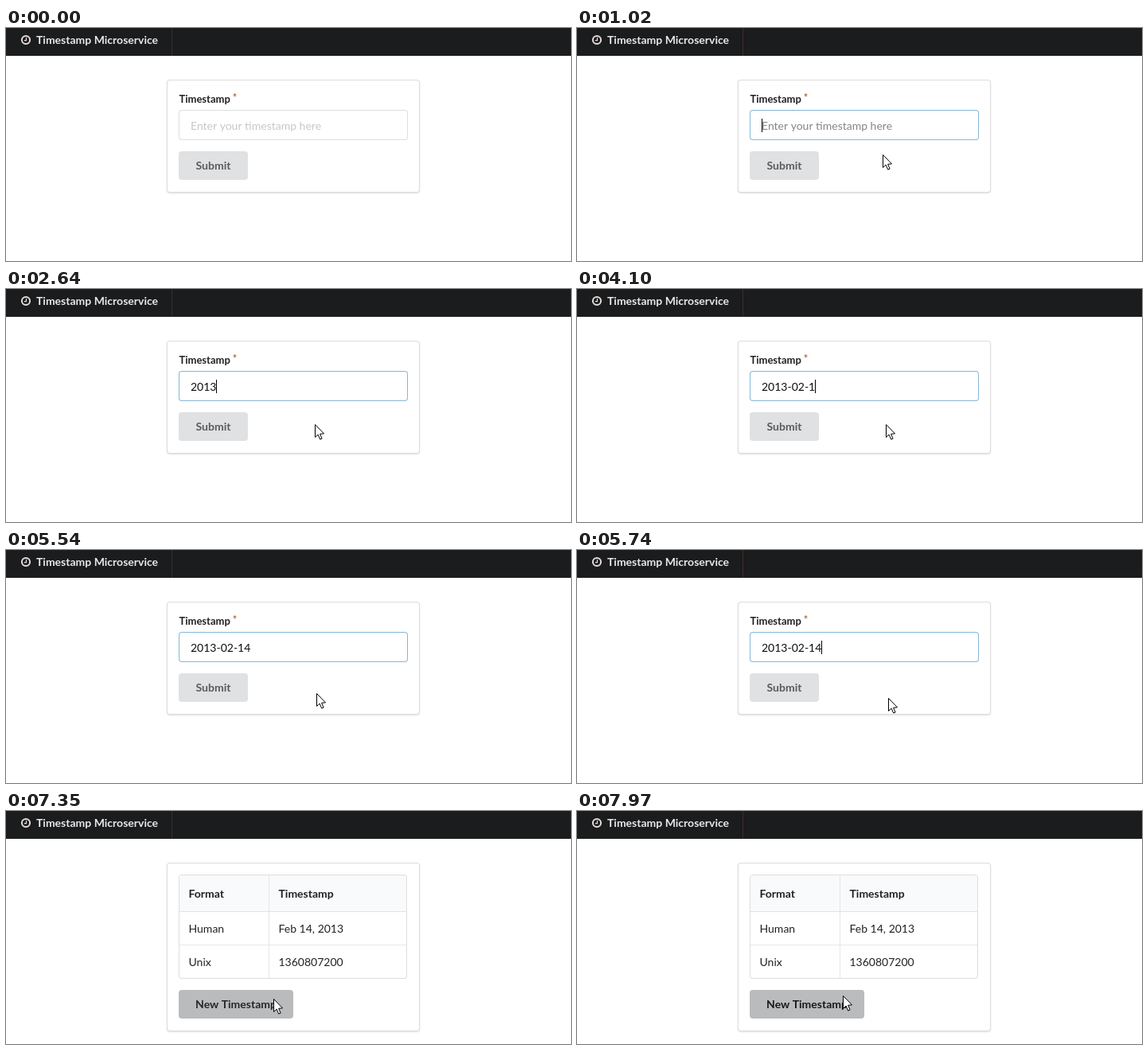
Animation, 710 px wide and 293 px high, one loop 8 s. Source, as an HTML page with a canvas:

```html
<!DOCTYPE html>
<html lang="en">
<head>
<meta charset="utf-8">
<title>Timestamp form</title>
<style>
  html, body { margin: 0; width: 100%; height: 100%; overflow: hidden; background: #fff; }
  canvas { display: block; }
</style>
</head>
<body>
<canvas id="stage" width="710" height="293"></canvas>
<script>
const ctx = document.getElementById('stage').getContext('2d');
const LOOP = 8000;
const RESULT_AT = 5940;
const BORDER = '#dededf';
const INK = 'rgba(0,0,0,.87)';
const SOFT = 'rgba(0,0,0,.6)';
const DATES = ['2016-05-22', '20 Jan 2015', '2011-05-22', '2012-03-15', '2015 02 03', '2015 Jan 02'];

// Each track holds [start time, ...values], kept until the next entry.
const pointer = [
  [0], [200, 495, 274], [400, 430, 190], [600, 376, 116, 'text'],
  [1020, 384, 159], [1220, 387, 166], [1420, 388, 170],
  [5340, 389, 175], [5540, 390, 180], [5740, 391, 186], [5940, 393, 194],
  [6140, 396, 202], [6550, 424, 215], [6750, 440, 226], [6990, 400, 232],
  [7150, 354, 235], [7350, 336, 236], [7770, 335, 234], [7970, 334, 232]
];
const typed = [
  [0, ''], [2040, '2'], [2240, '20'], [2440, '201'], [2640, '2013'], [2860, '2013-'],
  [3460, '2013-0'], [3680, '2013-02'], [3880, '2013-02-'], [4080, '2013-02-1'], [4300, '2013-02-14']
];
const caret = [
  [0, false], [1020, true], [1420, false], [2040, true], [3060, false], [3260, true],
  [4720, false], [5120, true], [5540, false], [5740, true]
];
const resetButton = [
  [0, '#e0e1e2', SOFT], [7150, '#cacbcd', 'rgba(0,0,0,.75)'],
  [7350, '#babbbc', 'rgba(0,0,0,.8)'], [7770, '#babbbc', 'rgba(0,0,0,.87)']
];

function at(track, t) {
  let found = track[0];
  for (const key of track) if (key[0] <= t) found = key;
  return found.slice(1);
}

const lato = (size, weight = 400) => `${weight} ${size}px Lato, sans-serif`;

function text(str, x, y, font, color, align = 'left') {
  ctx.font = font;
  ctx.fillStyle = color;
  ctx.textAlign = align;
  ctx.fillText(str, x, y);
}

function rect(x, y, w, h, color) {
  ctx.fillStyle = color;
  ctx.fillRect(x, y, w, h);
}

function fillRound(x, y, w, h, color, radius = 4) {
  ctx.beginPath();
  ctx.roundRect(x, y, w, h, radius);
  ctx.fillStyle = color;
  ctx.fill();
}

function box(x, y, w, h, border, fill = '#fff') {
  fillRound(x, y, w, h, border);
  fillRound(x + 1, y + 1, w - 2, h - 2, fill, 3);
}

function drawNav() {
  rect(0, 0, 710, 35, '#1b1c1d');
  rect(208, 0, 1, 35, '#3b2d2f');
  ctx.strokeStyle = '#e4dcda';
  ctx.lineWidth = 2;
  ctx.beginPath();
  ctx.arc(25, 15, 5.1, 0, Math.PI * 2);
  ctx.stroke();
  ctx.lineWidth = 1.2;
  ctx.beginPath();
  ctx.moveTo(25.5, 12);
  ctx.lineTo(25.5, 15.6);
  ctx.lineTo(22.8, 15.6);
  ctx.stroke();
  text('Timestamp Microservice', 38, 20, lato(14, 700), 'rgba(255,255,255,.9)');
}

function drawCard(h) {
  ctx.save();
  ctx.shadowColor = 'rgba(34,36,38,.15)';
  ctx.shadowBlur = 2;
  ctx.shadowOffsetY = 1;
  fillRound(202, 65, 318, h, BORDER);
  ctx.restore();
  fillRound(203, 66, 316, h - 2, '#fff', 3);
}

function button(label, y, w, fill, color) {
  fillRound(217, y, w, 36, fill);
  text(label, 217 + w / 2, y + 23, lato(14, 700), color, 'center');
}

function drawMenu(rows) {
  const h = rows.length * 24 + 2;
  rect(217, 141, 290, h, '#d3d3d3');
  rect(218, 142, 288, h - 2, '#fff');
  rows.forEach((row, i) =>
    text(row, 226, 158 + i * 24, '700 12.3px "Open Sans", sans-serif', '#000'));
}

function drawForm(t) {
  const focused = t >= 1020;
  const [value] = at(typed, t);
  drawCard(142);
  text('Timestamp', 217.5, 94, lato(13, 700), INK);
  text('*', 284.7, 92, lato(13, 700), '#b5673f');
  box(217, 103, 288, 38, focused ? '#85b7d9' : BORDER);
  if (value) text(value, 232, 128, lato(14), 'rgba(0,0,0,.95)');
  else text('Enter your timestamp here', 232, 128, lato(14), focused ? '#858585' : '#c7c7c7');
  if (at(caret, t)[0]) {
    ctx.font = lato(14);
    rect(Math.round(232 + ctx.measureText(value).width), 114, 1, 17, '#000');
  }
  button('Submit', 155, 87, '#e0e1e2', SOFT);
  const rows = value ? DATES.filter(d => d.startsWith(value)) : [];
  if (rows.length) drawMenu(rows);
}

function drawResult(t) {
  drawCard(212);
  box(217, 80, 287, 131, BORDER);
  fillRound(218, 81, 285, 45, '#f9fafb', [3, 3, 0, 0]);
  rect(218, 126, 285, 1, '#e1e1e2');
  rect(218, 168, 285, 1, '#e8e8e9');
  rect(330, 81, 1, 129, '#e6e6e7');
  const cells = [['Format', 'Timestamp', 109], ['Human', 'Feb 14, 2013', 153], ['Unix', '1360807200', 195]];
  cells.forEach(([name, value, y], i) => {
    const font = lato(14, i ? 400 : 700);
    text(name, 229.5, y, font, INK);
    text(value, 342.5, y, font, INK);
  });
  button('New Timestamp', 225, 144, ...at(resetButton, t));
}

function drawPointer(x, y, shape) {
  if (x === undefined) return;
  if (shape === 'text') {
    rect(x, y - 7, 1, 14, '#000');
    for (const dy of [-8, 7]) {
      rect(x - 3, y + dy, 3, 1, '#000');
      rect(x + 1, y + dy, 3, 1, '#000');
    }
    return;
  }
  const points = [[0, 0], [0, 16], [3.6, 12.6], [6.2, 18.6], [8.6, 17.6], [6.1, 11.8], [11, 11.4]];
  ctx.beginPath();
  for (const [px, py] of points) ctx.lineTo(x + px + 0.5, y + py + 0.5);
  ctx.closePath();
  ctx.fillStyle = '#fff';
  ctx.fill();
  ctx.strokeStyle = '#000';
  ctx.lineWidth = 1;
  ctx.stroke();
}

function frame(now) {
  const t = (now - start) % LOOP;
  rect(0, 0, 710, 293, '#fff');
  drawNav();
  if (t < RESULT_AT) drawForm(t);
  else drawResult(t);
  drawPointer(...at(pointer, t));
  requestAnimationFrame(() => frame(performance.now()));
}

const start = performance.now();
frame(start);
</script>
</body>
</html>
```
